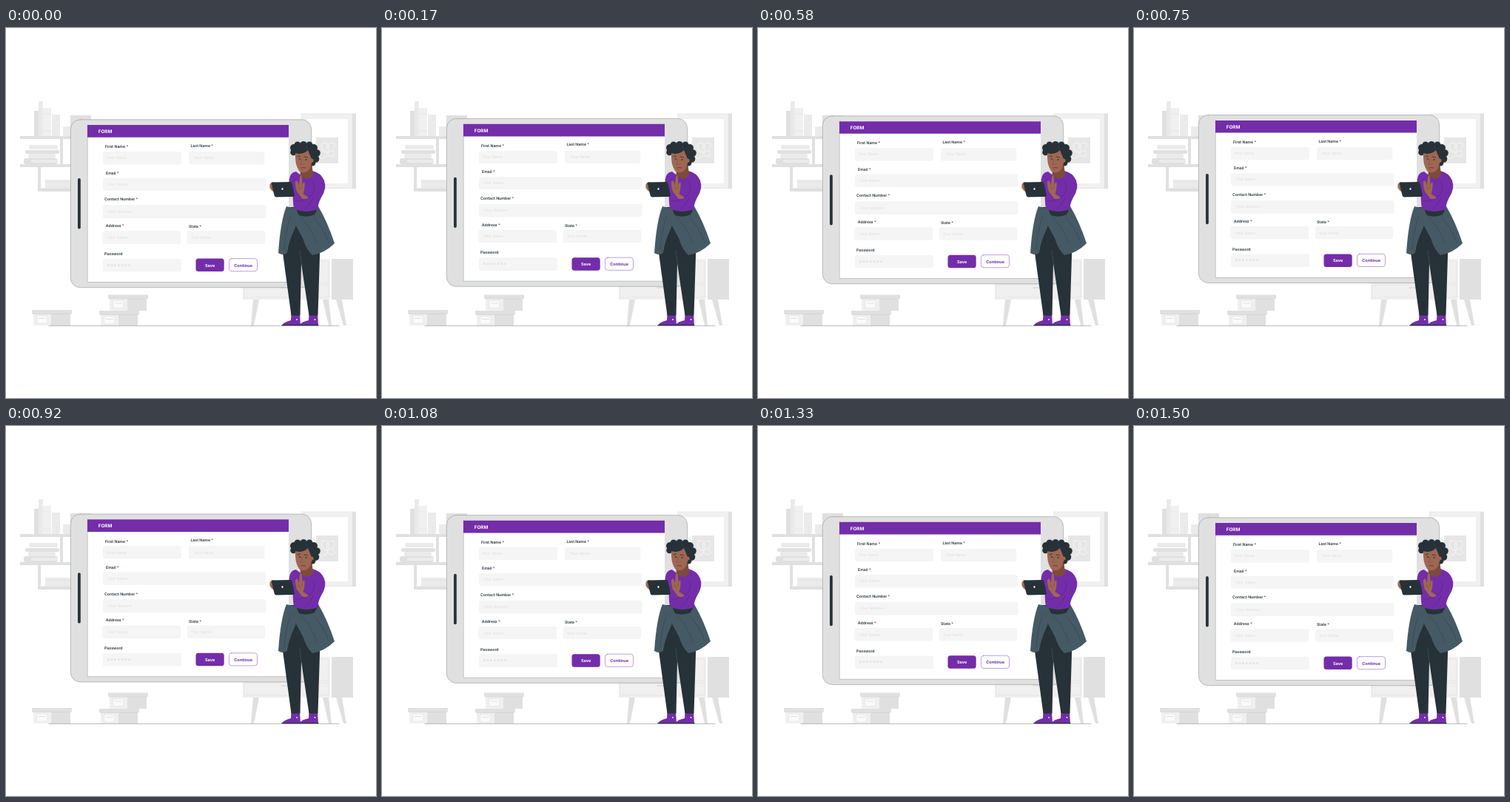
Animation of 500x500 px, one loop 1.54 s. Source, as an HTML page with a canvas:

```html
<!DOCTYPE html>
<html lang="en">
<head>
<meta charset="utf-8">
<title>Form</title>
<style>
html, body { margin: 0; width: 100%; height: 100%; overflow: hidden; background: #fff; }
canvas { display: block; width: 500px; height: 500px; }
</style>
</head>
<body>
<canvas id="stage" width="500" height="500"></canvas>
<script>
const ctx = document.getElementById('stage').getContext('2d');
const PURPLE = '#742da9', DARK = '#263238', SLATE = '#455a64', SKIN = '#9f6753', SKIN_DARK = '#7d4b3c';
const GREY = '#e0e0e0', MID = '#ebebeb', PALE = '#f5f5f5', WHITE = '#fff', EDGE = '#92979a';
const LOOP = 1540, STEP = 125 / 3, FLOAT = 1500, RISE = 6.4;

function box(x1, y1, x2, y2, color, r = 0) {
  ctx.fillStyle = color;
  ctx.beginPath();
  ctx.roundRect(x1, y1, x2 - x1, y2 - y1, r);
  ctx.fill();
}
function frame(x1, y1, x2, y2, color, r = 0, width = 0.6) {
  ctx.strokeStyle = color;
  ctx.lineWidth = width;
  ctx.beginPath();
  ctx.roundRect(x1, y1, x2 - x1, y2 - y1, r);
  ctx.stroke();
}
function fill(d, color) {
  ctx.fillStyle = color;
  ctx.fill(new Path2D(d));
}
function line(d, color, width = 0.6) {
  ctx.strokeStyle = color;
  ctx.lineWidth = width;
  ctx.stroke(new Path2D(d));
}
function dot(x, y, r, color) {
  ctx.fillStyle = color;
  ctx.beginPath();
  ctx.arc(x, y, r, 0, Math.PI * 2);
  ctx.fill();
}
function text(s, x, y, size, weight, color, align = 'left') {
  ctx.font = `${weight} ${size}px Inter, "Open Sans", sans-serif`;
  ctx.textAlign = align;
  ctx.fillStyle = color;
  ctx.fillText(s, x, y);
}

function drawShelf() {
  box(38, 112, 44, 146, GREY);
  box(44, 99, 50, 146, MID);
  line('M46 101V144', GREY);
  box(50, 108, 61, 146, '#f0f0f0');
  line('M50 116H61M50 139H61', GREY);
  box(62, 117, 73, 146, MID);
  box(77, 133, 87, 146, MID);
  box(87, 118, 115, 146, GREY);

  box(31, 158, 70, 164, MID, 2);
  box(26, 165, 72, 170, GREY, 2);
  box(30, 170, 67, 176, MID, 2);
  box(24, 176, 70, 184, GREY, 3);
  box(34, 178, 70, 182, MID);

  box(53, 205, 90, 217, MID);
  line('M53 208H90M80 205V217', GREY);

  box(19, 146, 115, 150, GREY);
  box(19, 184, 115, 188, GREY);
  box(73, 150, 77, 184, GREY);
  box(43, 188, 47, 220, GREY);
  box(43, 216.5, 115, 221, GREY);
}

function drawPicture() {
  box(400, 116, 468, 217, '#f0f0f0');
  box(468, 116, 473, 217, GREY);
  box(406, 123, 462, 210, WHITE);
  frame(400, 116, 472.5, 216.5, GREY);
  box(419, 148, 449, 183, '#e6e6e6');
  line('M424 176C436 178 440 158 432 155C424 153 424 167 433 168C443 168 448 157 441 155C434 153 429 169 437 173C443 176 447 168 441 166', '#f2f2f2', 1.3);
}

function drawCabinet() {
  fill('M334 367H342L335 402H331ZM428 367H436L440 402H436ZM446 367H454L460 402H456Z', GREY);
  box(320, 312, 438, 367, '#f0f0f0');
  box(438, 312, 440, 367, WHITE);
  box(440, 312, 469, 367, GREY);
  frame(322, 347, 436, 364, GREY);
  frame(322, 315, 436, 344, GREY);
  box(371, 350, 388, 352, GREY, 1);
}

function drawCrate(x, y, height) {
  box(x + 2, y + 5, x + 26, y + height, '#f0f0f0');
  box(x + 26, y + 5, x + 52, y + height, GREY);
  box(x, y, x + 54, y + 5.3, GREY);
  line(`M${x + 2} ${y + 5.5}H${x + 52}`, '#d0d0d0', 0.7);
  box(x + 7, y + 8, x + 21, y + 18, '#fafafa');
  frame(x + 7, y + 8, x + 21, y + 18, GREY);
  box(x + 9, y + 11, x + 19, y + 12, GREY);
}

function field(label, x, y, area, placeholder, hintX, hintY, required = true) {
  box(...area, PALE, 3);
  text(label, x, y, 5.2, 600, DARK);
  if (required) {
    const end = x + ctx.measureText(label + ' ').width;
    text('*', end, y, 5.2, 600, PURPLE);
  }
  text(placeholder, hintX, hintY, 5.2, 400, '#dedede');
}

function drawTablet() {
  box(87.3, 123.7, 412.6, 350.6, GREY, 13);
  frame(87.3, 123.7, 412.6, 350.6, EDGE, 13);
  box(97, 203, 100.8, 271.3, DARK, 1.9);
  box(110, 131.2, 382, 343.2, WHITE);
  line('M110.2 131V343.4H382', EDGE, 0.5);
  box(110, 131, 382, 147.7, PURPLE);
  text('FORM', 124.8, 142, 6.3, 700, WHITE);

  field('First Name', 134, 162.2, [131, 167, 237, 184.3], 'Your Name', 136, 177.2);
  field('Last Name', 249.4, 160.8, [247, 167, 349.3, 184.3], 'Your Name', 254, 177.2);
  field('Email', 135, 197.4, [131, 202.3, 351.5, 219.6], 'Your Name', 137, 212.6);
  field('Contact Number', 133, 233.2, [130.8, 239, 351.7, 256.8], 'Your Number', 138, 249.6);
  field('Address', 134.8, 268.9, [130.3, 274.2, 236.3, 291.6], 'Your Name', 137, 284.8);
  field('State', 247, 270.2, [244.7, 274.2, 350.4, 291.6], 'Your Name', 250, 284.8);
  field('Password', 133, 306.8, [131, 311.6, 237.2, 329.2], '', 0, 0, false);
  text('*******', 136, 324.4, 8.4, 700, GREY);

  box(256.5, 311.5, 294.7, 329, PURPLE, 3.5);
  text('Save', 275.6, 322.6, 5.6, 700, WHITE, 'center');
  frame(301.5, 311.5, 339.5, 328.6, PURPLE, 3.5, 0.45);
  text('Continue', 320.6, 322.6, 5.6, 700, PURPLE, 'center');
}

function drawLegs() {
  fill('M385.5 386H397L398 402H373Q374 398 385 395Z', PURPLE);
  fill('M409.5 386H421L422 402H396Q399 397 409 395Z', PURPLE);
  line('M373 401.6H398M396.5 401.6H422', DARK, 1.2);
  dot(393, 394, 0.9, WHITE);
  dot(417.5, 394, 0.9, WHITE);
  fill('M382 242H421Q425 270 424 308L421.5 388.5H409.5L399 318L397.5 388.5H385.5L374 304Q372 270 382 242Z', DARK);
  line('M397 300L399 318', SLATE);
  // jacket: a hanging sleeve on the left, the body of it on the right
  fill('M379 241Q371 260 368 304Q374 308 380 304Q382 288 390 272L396 254L392 244Z', SLATE);
  fill('M388 246Q406 251 422 241Q434 261 444 291Q431 304 414 307Q406 300 401 284L389 262Z', SLATE);
  fill('M393 247Q407 250 421 244L417 252Q406 257 396 253Z', DARK);
  line('M396 254Q410 264 420 292M385 254Q378 270 376 300M415 256Q428 268 436 290', '#34464f');
  dot(387, 249, 4.5, SLATE);
}

function drawHead() {
  fill('M397 188L413 180L415 200Q406 207 398 200Z', SKIN_DARK);
  const curls = [[389, 162, 5], [394, 158, 4.5], [402, 157.5, 4.5], [410, 158, 4.5], [416, 162, 5],
    [420, 169, 4.8], [418.5, 177, 4.8], [414, 182, 4.5], [388.5, 168, 4.3], [397, 165, 8], [408, 170, 10]];
  for (const [x, y, r] of curls) dot(x, y, r, DARK);
  fill('M391 169Q401 172 408 165L413 177Q414 187 408 193Q402 197.5 396 193Q390 184 391 169Z', SKIN);
  dot(413, 179, 2.6, SKIN);
  dot(402, 163, 4.5, DARK);
  dot(394, 165, 4, DARK);
  dot(397, 177, 0.9, DARK);
  dot(405.5, 178, 0.9, DARK);
  line('M394 174L397.5 173M403 174L407.5 175', DARK, 0.8);
  line('M400 177L398.5 184L401.5 184.5', SKIN_DARK);
  line('M399 189Q402 188 404.5 189', '#5c2f27', 0.8);
}

function drawTorso() {
  fill('M392 194Q384 195 383 204L382 212L388 218Q387 232 389 244Q405 251 422 245Q421 238 426 229Q434 217 430 206Q426 196 414 193Q406 203 397 198Z', PURPLE);
  line('M397 198Q406 204 414 193M415 209Q419 218 413 226Q403 234 392 234M403 244Q411 240 415 229', '#5a2085');
}

function drawHands() {
  fill('M356.5 211Q359 207 363 209L369 213L366 223Q360 222 356.5 216Z', SKIN);
  fill('M360 208.5L384 208Q386 208 386.5 210L390 226Q390 228 388 228L365 228.5Q363 228 362.5 226L358.8 210Q359 208.5 360 208.5Z', DARK);
  dot(373.5, 217.5, 1.2, WHITE);
  fill('M391 208Q392.5 205 394.5 208L396 212L397 201Q398.5 197 399.8 201L400.5 211Q403.5 206 403.5 210Q404 218 401.5 224L409 229Q404 233 400 230L393 221Q390.5 214 391 208Z', SKIN);
  line('M395 210L396 216M400 211L400 216M394 217Q397 219 400 217', SKIN_DARK, 0.5);
}

// The picture steps on the nearest 10 ms of a 24 fps clock.
const startOf = n => Math.round(n * STEP / 10) * 10;

function liftAt(time) {
  let n = Math.min(36, Math.floor(time / STEP) + 1);
  while (n > 0 && startOf(n) > time) n--;
  const phase = (n * STEP + 10) / FLOAT % 1;
  return RISE * (1 - Math.abs(1 - 2 * phase)) - 0.2;
}

function draw(now) {
  ctx.fillStyle = WHITE;
  ctx.fillRect(0, 0, 500, 500);
  drawShelf();
  drawPicture();
  drawCabinet();
  drawCrate(138, 360.5, 21.5);
  drawCrate(35, 381, 21);
  drawCrate(126, 382, 20);
  line('M58 402.4H450', '#80868a');

  ctx.save();
  ctx.translate(0, -liftAt(now % LOOP));
  drawTablet();
  ctx.restore();

  drawLegs();
  drawTorso();
  drawHead();
  drawHands();
  requestAnimationFrame(draw);
}
ctx.lineCap = ctx.lineJoin = 'round';
ctx.textRendering = 'geometricPrecision';
draw(0);
</script>
</body>
</html>
```
